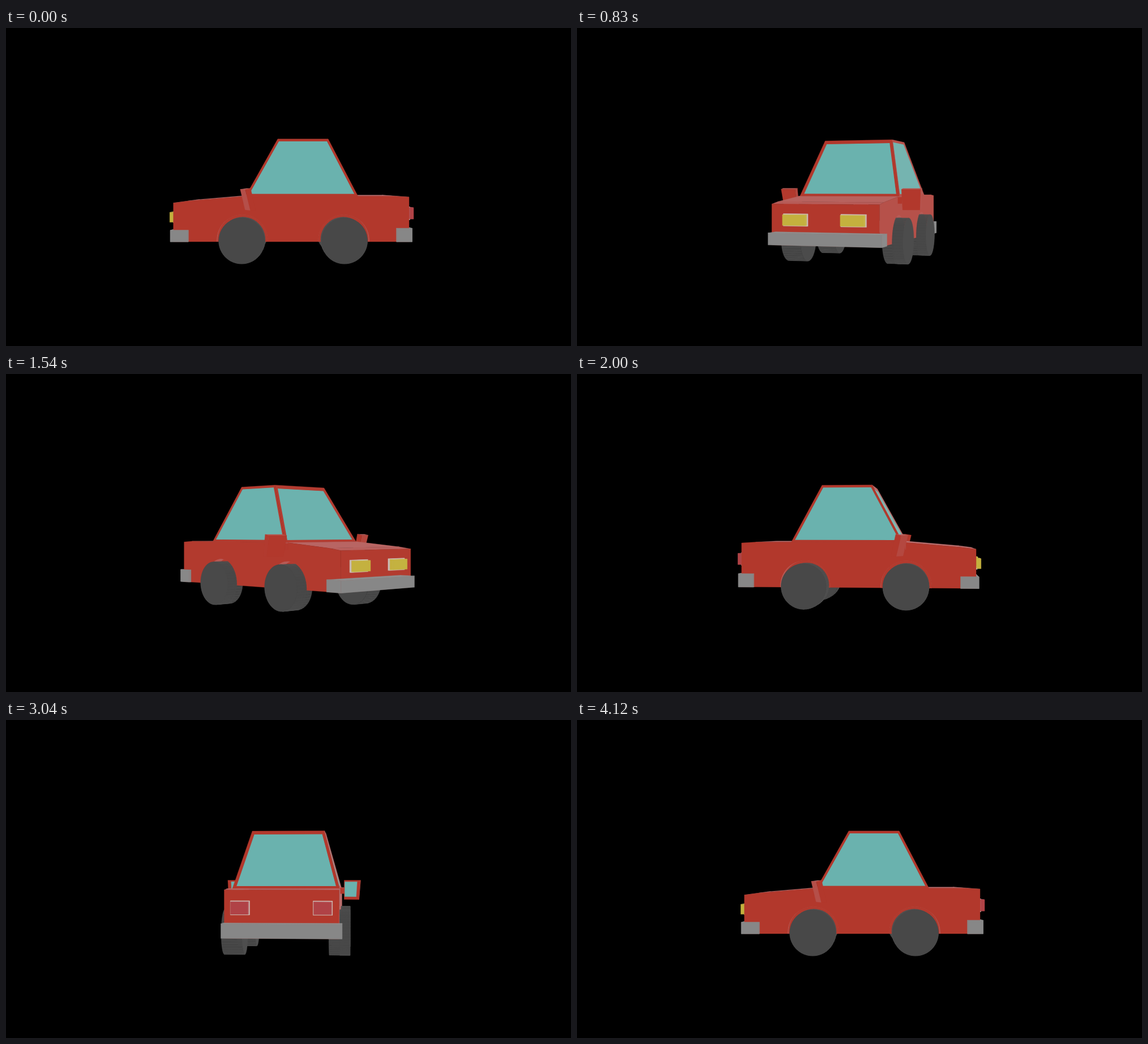
An HTML page with a canvas that plays this animation: 998x561 px, repeating every 4.22 s.

```html
<!DOCTYPE html>
<html lang="en">
<head>
<meta charset="utf-8">
<title>Turning car</title>
<style>
  html, body { margin: 0; width: 100%; height: 100%; overflow: hidden; background: #000; }
  canvas { display: block; }
</style>
</head>
<body>
<canvas id="stage" width="998" height="561"></canvas>
<script>
const ctx = document.getElementById('stage').getContext('2d');
const LOOP = 4220, STEPS = 99, DIST = 1386;

// Each material: colour seen face-on, colour seen at a grazing angle
const RED = [[178, 56, 44], [186, 112, 112]];
const GLASS = [[106, 178, 174], [130, 182, 178]];
const TYRE = [[72, 72, 72], [82, 82, 82]];
const METAL = [[135, 135, 135], [144, 144, 144]];
const LAMP = [[196, 177, 62], [204, 186, 92]];
const TAIL = [[176, 66, 70], [186, 92, 98]];
const TRIM = [[203, 190, 182], [206, 194, 188]];

// Car space: x to the rear, y down, z to the car's left
const BODY_W = 87.5, FLOOR = 90.3, END = 195;
const TOP = [[-END, 26.5], [-171, 23.3], [-75, 15.2], [171, 15.2], [END, 16.7]];
const BODY_MID = [0, 55, 0], CABIN_MID = [18, -30, 0];
const AXLES = [-81, 87], HUB = 87.9, TYRE_R = 37.5, ARCH_R = 42.4;
const TYRE_IN = 70, TYRE_OUT = 104, PANE_DEPTH = 1.8;

let cos = 1, sin = 0;

const lerp = (a, b, f) => a + (b - a) * f;
const sub = (a, b) => a.map((v, i) => v - b[i]);
const dot = (a, b) => a[0] * b[0] + a[1] * b[1] + a[2] * b[2];
const cross = (a, b) => [
  a[1] * b[2] - a[2] * b[1],
  a[2] * b[0] - a[0] * b[2],
  a[0] * b[1] - a[1] * b[0]
];
const mean = pts => [0, 1, 2].map(i => pts.reduce((s, p) => s + p[i], 0) / pts.length);

const turn = ([x, y, z]) => [x * cos + z * sin + 4.5, y, z * cos - x * sin];

function project(p) {
  const [x, y, z] = turn(p), k = DIST / (DIST - z);
  return [499 + x * k, 280.5 + y * k];
}

function trace(pts) {
  ctx.beginPath();
  pts.forEach(p => ctx.lineTo(...project(p)));
  ctx.closePath();
}

// Cosine between the outward normal of a face and the line of sight
function facing(pts, mid) {
  const v = pts.map(turn), c = mean(v);
  const n = cross(sub(v[1], v[0]), sub(v[2], v[0]));
  const eye = sub([0, 0, DIST], c);
  const side = dot(n, sub(c, turn(mid))) < 0 ? -1 : 1;
  return side * dot(n, eye) / Math.sqrt(dot(n, n) * dot(eye, eye));
}

function tone(mat, f) {
  return `rgb(${mat[0].map((v, i) => Math.round(lerp(v, mat[1][i], f))).join()})`;
}
const shade = (mat, c) => tone(mat, (1 - c) ** 3);

function paint(pts, color) {
  trace(pts);
  ctx.fillStyle = ctx.strokeStyle = color;
  ctx.lineWidth = 0.4;
  ctx.fill();
  ctx.stroke();
}

function face(pts, mat, mid) {
  const c = facing(pts, mid);
  if (c > 0) paint(pts, shade(mat, c));
}

// Points 0-3 run round one end, 4-7 round the other
function solid(p, mat) {
  const mid = mean(p);
  face(p.slice(0, 4), mat, mid);
  face(p.slice(4), mat, mid);
  for (let i = 0; i < 4; i++) {
    const j = (i + 1) % 4;
    face([p[i], p[j], p[j + 4], p[i + 4]], mat, mid);
  }
}

function box(x0, x1, y0, y1, z0, z1, mat) {
  const ring = x => [[x, y0, z0], [x, y0, z1], [x, y1, z1], [x, y1, z0]];
  solid([...ring(x0), ...ring(x1)], mat);
}

function arc(x, z, r, from, to, n) {
  return Array.from({ length: n + 1 }, (_, i) => {
    const a = lerp(from, to, i / n);
    return [x + r * Math.cos(a), HUB + r * Math.sin(a), z];
  });
}
const disc = (x, z, r) => arc(x, z, r, 0, Math.PI * 2, 48);

function tyre(x, z0, z1) {
  const a = disc(x, z0, TYRE_R), b = disc(x, z1, TYRE_R);
  const mid = [x, HUB, (z0 + z1) / 2];
  for (let i = 0; i < 48; i++) face([a[i], a[i + 1], b[i + 1], b[i]], TYRE, mid);
  for (const ring of [a, b]) {
    const c = facing([ring[0], ring[16], ring[32]], mid);
    if (c > 0) paint(ring, shade(TYRE, c));
  }
}

function arch(x, m) {
  const half = (z, low) => [
    [x - ARCH_R, low, z],
    ...arc(x, z, ARCH_R, Math.PI, Math.PI * 2, 30),
    [x + ARCH_R, low, z]
  ];
  ctx.save();
  trace(disc(x, m * BODY_W, ARCH_R));
  ctx.clip();
  ctx.save();
  const rim = half(m * BODY_W, FLOOR);
  trace(rim);
  ctx.clip();
  paint(rim, tone(RED, 0.6));
  paint(half(m * TYRE_IN, FLOOR + 8), tone(RED, 0.03));
  ctx.restore();
  tyre(x, m * TYRE_IN, m * TYRE_OUT);
  ctx.restore();
  tyre(x, m * BODY_W, m * TYRE_OUT);
}

function mirror(m) {
  const ring = (y, front, shift, out) => [
    [-84 + shift, front, m * 93], [-74 + shift, front, m * out],
    [-65.5 + shift, y, m * out], [-74 + shift, y, m * 93]
  ];
  const p = [...ring(2.3, 4, 0, 123), ...ring(37.6, 37.6, 8, 120)];
  box(-80, -71, 16, 27, m * 86, m * 93, RED);
  solid(p, RED);
  const at = (u, v) => [0, 1, 2].map(i =>
    lerp(lerp(p[3][i], p[2][i], u), lerp(p[7][i], p[6][i], u), v));
  face([at(0.04, 0.08), at(0.8, 0.08), at(0.8, 0.85), at(0.04, 0.85)], GLASS, mean(p));
}

// e is -1 for the front end and 1 for the rear
function bumper(e, z0, z1) {
  box(e * 199.5, e < 0 ? -170 : 174, e < 0 ? 71.4 : 68.1, FLOOR, z0, z1, METAL);
}

function lights(e) {
  const [y0, y1, z0, z1, mat] = e < 0 ? [41.5, 60.4, 27.1, 67, LAMP] : [33.3, 54.7, 48.4, 77.6, TAIL];
  const rim = 1.2;
  for (const m of [-1, 1]) {
    box(e * END, e * 198, y0, y1, m * z0, m * z1, TRIM);
    box(e * 198, e * 204.3, y0 + rim, y1 - rim, m * (z0 + rim), m * (z1 - rim), mat);
  }
}

function endFace(e) {
  const y = e < 0 ? TOP[0][1] : TOP[4][1];
  return [[e * END, y, -BODY_W], [e * END, y, BODY_W], [e * END, FLOOR, BODY_W], [e * END, FLOOR, -BODY_W]];
}

function sideFace(m) {
  return [[END, FLOOR, m * BODY_W], [-END, FLOOR, m * BODY_W],
    ...TOP.map(([x, y]) => [x, y, m * BODY_W])];
}

function body() {
  for (let i = 0; i < 4; i++) {
    const [[x0, y0], [x1, y1]] = [TOP[i], TOP[i + 1]];
    face([[x0, y0, -BODY_W], [x0, y0, BODY_W], [x1, y1, BODY_W], [x1, y1, -BODY_W]], RED, BODY_MID);
  }
  for (const s of [-1, 1]) {
    face(sideFace(s), RED, BODY_MID);
    face(endFace(s), RED, BODY_MID);
  }
}

function cabinAt(y) {
  const f = (y + 81) / 95.9;
  return { front: lerp(-22.7, -75.3, f), rear: lerp(62.5, 110.3, f), w: lerp(61, BODY_W, f) };
}

// Glass set a little behind its opening
function pane(y0, y1, edge, dx, dz) {
  const [a, b] = edge(y0), [c, d] = edge(y1);
  const hole = [a, b, d, c];
  const angle = facing(hole, CABIN_MID);
  if (angle <= 0) return;
  ctx.save();
  trace(hole);
  ctx.clip();
  paint(hole.map(([x, y, z]) => [x + dx, y, z + dz]), shade(GLASS, angle));
  ctx.restore();
}

function cabin() {
  const ring = y => {
    const { front, rear, w } = cabinAt(y);
    return [[front, y, -w], [front, y, w], [rear, y, w], [rear, y, -w]];
  };
  solid([...ring(-81), ...ring(15.2)], RED);
  for (const s of [-1, 1]) {
    pane(-77, 11.6, y => {
      const { front, rear, w } = cabinAt(y);
      return [[front + 4, y, s * w], [rear - 4, y, s * w]];
    }, 0, -s * PANE_DEPTH);
    pane(-75.2, 11.5, y => {
      const { front, rear, w } = cabinAt(y), x = s < 0 ? front : rear;
      return [[x, y, 5.2 - w], [x, y, w - 5.2]];
    }, -s * PANE_DEPTH, 0);
  }
}

function draw(angle) {
  cos = Math.cos(angle);
  sin = Math.sin(angle);
  ctx.fillStyle = '#000';
  ctx.fillRect(0, 0, 998, 561);

  const both = [-1, 1];
  const nearSides = both.filter(m => facing(sideFace(m), BODY_MID) > 0);
  const nearEnds = both.filter(e => facing(endFace(e), BODY_MID) > 0);
  const farEnds = both.filter(e => !nearEnds.includes(e));
  const depth = ([x, m]) => turn([x, HUB, m * BODY_W])[2];
  const wheels = AXLES.flatMap(x => both.map(m => [x, m])).sort((a, b) => depth(a) - depth(b));

  for (const [x, m] of wheels) tyre(x, m * TYRE_IN, m * TYRE_OUT);
  for (const e of farEnds) {
    lights(e);
    bumper(e, -92, 92);
  }
  both.filter(m => !nearSides.includes(m)).forEach(mirror);

  body();
  cabin();

  for (const m of nearSides) {
    for (const e of farEnds) bumper(e, m * BODY_W, m * 92);
  }
  for (const [x, m] of wheels) if (nearSides.includes(m)) arch(x, m);
  for (const e of nearEnds) {
    bumper(e, -92, 92);
    lights(e);
  }
  nearSides.forEach(mirror);
}

// 24 steps a second on a 10 ms clock; the last step is held
function stepAt(ms) {
  const tick = Math.floor(ms / 10);
  return Math.min(STEPS, Math.ceil(0.24 * (tick + 1)) - 1);
}

let start = null;
function frame(now) {
  if (start === null) start = now;
  const n = stepAt((now - start) % LOOP);
  draw(n / STEPS * Math.PI * 2);
  requestAnimationFrame(frame);
}
draw(0);
requestAnimationFrame(frame);
</script>
</body>
</html>
```
